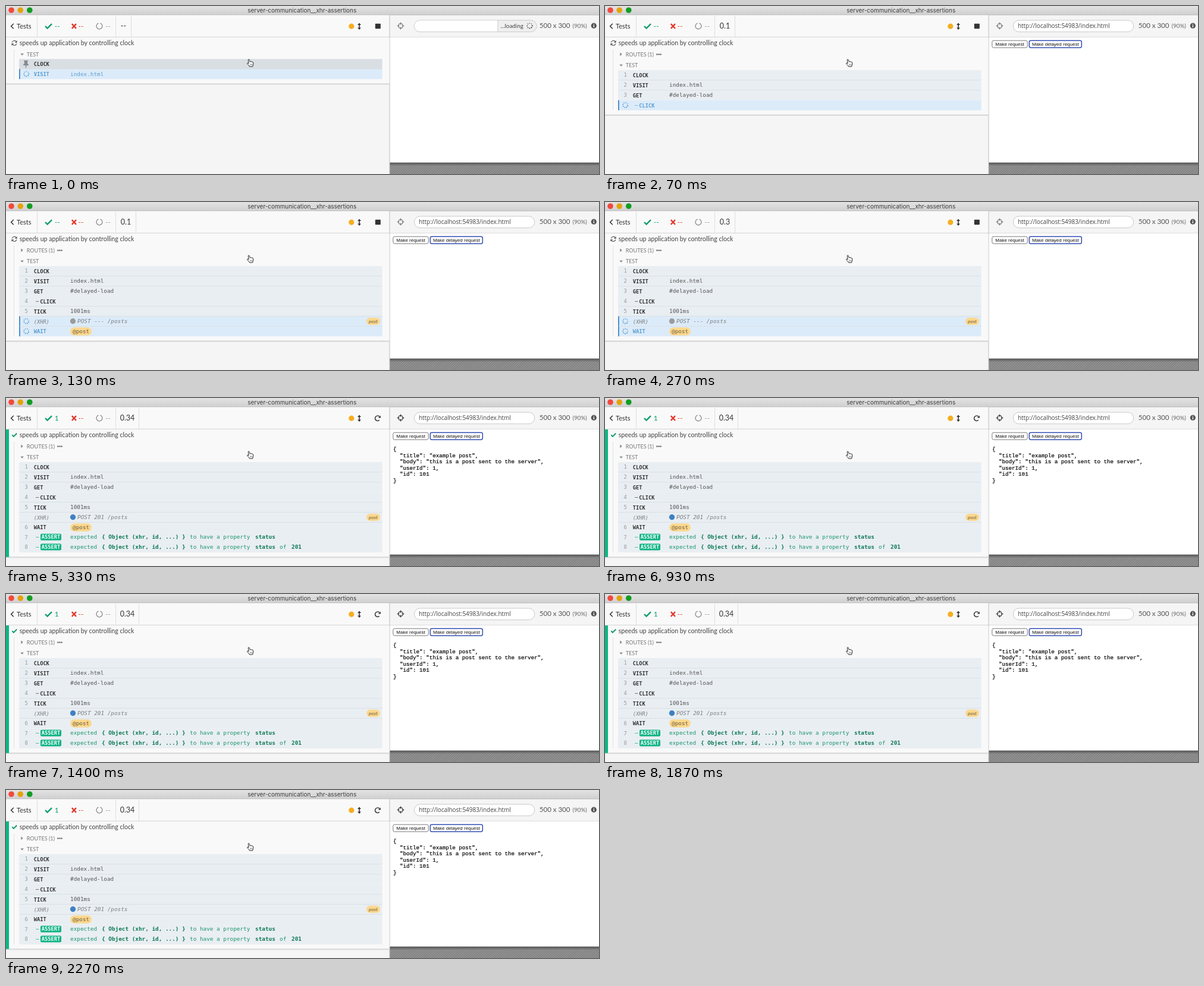
An HTML page that plays this animation: 997x283 px, repeating every 2.34 s.

```html
<!DOCTYPE html>
<html lang="en">
<head>
<meta charset="utf-8">
<title>Test runner</title>
<style>
  html, body { margin: 0; width: 100%; height: 100%; overflow: hidden; background: #f5f5f5; }
  svg { display: block; width: 997px; height: 283px; }
  text { white-space: pre; }
  .ui { font-family: Lato, sans-serif; }
  .mono { font-family: "DejaVu Sans Mono", monospace; }
  .arial { font-family: "Liberation Sans", sans-serif; }
  .courier { font-family: "Liberation Mono", monospace; }
  .url { font-family: "Open Sans", sans-serif; }
  .title { font-family: Inter, sans-serif; }
</style>
</head>
<body>
<svg id="stage" viewBox="0 0 997 283" xmlns="http://www.w3.org/2000/svg">
  <defs>
    <linearGradient id="bar" x2="0" y2="1">
      <stop offset="0" stop-color="#e4e3e4"/><stop offset="1" stop-color="#d0cfd0"/>
    </linearGradient>
    <linearGradient id="shade" x2="0" y2="1">
      <stop offset="0" stop-color="#333" stop-opacity=".65"/><stop offset="1" stop-color="#333" stop-opacity="0"/>
    </linearGradient>
    <pattern id="hatch" width="3" height="3" patternUnits="userSpaceOnUse" patternTransform="rotate(-45)">
      <rect width="3" height="3" fill="#979797"/><rect width="3" height="1.4" fill="#7c7c7c"/>
    </pattern>
  </defs>
  <g id="frame"></g>
  <g id="view"></g>
  <g id="pointer" transform="translate(405 89)" stroke="#222" stroke-width="1" stroke-linejoin="round" fill="#fff">
    <path d="M2.2 1.3Q3.4 .2 4.3 1.6L5.2 5Q6.2 4 7.2 5Q8.2 4.2 9 5.4Q10.4 5 10.7 6.6L10.6 9.6L9.6 13H4.4L3.4 11L.6 8.3Q.2 7 1.6 7L3.1 8Z"/>
    <path d="M5.6 8.5V11M7.2 8.5V11M8.8 8.5V11" stroke-width=".5"/>
  </g>
</svg>
<script>
const LOOP = 2340;
const GREEN = '#0f9d6c', RED = '#e33b2e', GREY = '#a0a0a0', BLUE = '#5a9ed2', INK = '#333';
const $ = id => document.getElementById(id);

const rect = (x, y, w, h, fill, extra = '') =>
  `<rect x="${x}" y="${y}" width="${w}" height="${h}" fill="${fill}" ${extra}/>`;
const circle = (x, y, r, fill, extra = '') => `<circle cx="${x}" cy="${y}" r="${r}" fill="${fill}" ${extra}/>`;
const line = (d, stroke, width = 1, extra = '') =>
  `<path d="${d}" fill="none" stroke="${stroke}" stroke-width="${width}" ${extra}/>`;
const text = (cls, x, y, size, fill, str, extra = '') =>
  `<text class="${cls}" x="${x}" y="${y}" font-size="${size}" fill="${fill}" ${extra}>${str}</text>`;
const mono = (x, y, fill, str, extra) => text('mono', x, y, 9.35, fill, str, extra);
const method = (x, y, fill, str, extra = 'font-weight="700"') => text('mono', x, y, 8.7, fill, str, extra);
const ITALIC = 'font-style="italic"', BOLD = 'font-weight="700"', MIDDLE = 'text-anchor="middle"';

function spinner(x, y, r, fill) {
  let dots = '';
  for (let i = 0; i < 8; i++) {
    const a = i * Math.PI / 4;
    dots += circle((r * Math.cos(a)).toFixed(2), (r * Math.sin(a)).toFixed(2), (1.1 - i * 0.05).toFixed(2), fill);
  }
  return `<g class="spin" data-at="${x} ${y}">${dots}</g>`;
}

function reload(x, y, r, color, width) {
  const k = r * 0.72;
  return line(`M${x + k} ${y + k}A${r} ${r} 0 1 1 ${x + k} ${y - k}`, color, width) +
    `<path d="M${x + r + 1} ${y - r - .6}v${r}h${-r}z" fill="${color}"/>`;
}

function cycle(x, y) {
  return line(`M${x - 3.8} ${y - 1}A4 4 0 0 1 ${x + 3} ${y - 2.7}M${x + 3.8} ${y + 1}A4 4 0 0 1 ${x - 3} ${y + 2.7}`, '#555', 1.2) +
    `<path d="M${x + 4.6} ${y - 4.4}v3.8h-3.8zM${x - 4.6} ${y + 4.4}v-3.8h3.8z" fill="#555"/>`;
}

const check = (x, y, s, w) =>
  line(`M${x} ${y}l${3.6 * s} ${3.6 * s}l${7.4 * s} ${-7.4 * s}`, GREEN, w);

function fixedParts() {
  let s = rect(0, 0, 997, 283, '#f5f5f5');
  s += rect(0, 0, 997, 15, 'url(#bar)') + line('M0 15H997', '#b9b8b9');
  s += circle(9, 7, 4.8, '#f2493c') + circle(24.2, 7, 4.8, '#e4a20c') + circle(39.8, 7, 4.8, '#129e22');
  s += text('title', 497.7, 10.7, 9.95, '#3c3c3c', 'server-communication__xhr-assertions', MIDDLE);

  s += rect(0, 15.5, 645, 36.5, '#f9f9f9') + line('M0 52.3H645', '#d5d5d5');
  s += line('M52.5 16V52M184.5 16V52', '#dedede');
  s += line('M12.8 29.8L8.6 34L12.8 38.2', INK, 1.5) + text('ui', 18, 37.6, 11, INK, 'Tests');
  s += check(66, 34, 1, 2.4);
  s += line('M110.8 30.2L118 37.8M118 30.2L110.8 37.8', RED, 2.4);
  s += text('ui', 121.5, 38, 12, RED, '--');
  s += line('M158.4 29.1A5 5 0 1 1 155.6 29.1', GREY, 1.6) + text('ui', 167.3, 38, 12, GREY, '--');
  s += circle(580.8, 34.2, 4.6, '#f5ae1f');
  s += line('M594 31V37.5', INK, 1.6) + `<path d="M594 28.4l3 3.6h-6zM594 40l3-3.6h-6z" fill="${INK}"/>`;

  s += rect(645, 53, 352, 211, '#fff') + line('M645 52.3H997', '#dcdcdc');
  s += rect(645, 264, 352, 19, 'url(#hatch)') + rect(645, 263.6, 352, 6, 'url(#shade)');
  s += text('ui', 896.8, 37.3, 11.5, '#555', '500 x 300') + text('ui', 952.6, 37, 9.7, '#666', '(90%)');
  s += circle(988.3, 33.2, 4.6, '#555') + rect(987.6, 32.4, 1.5, 3.4, '#fff') + circle(988.3, 30.8, .8, '#fff');
  return s + line('M645 15.5V283', '#bdbdbd');
}

const badge = (y) => rect(108, y - 6.6, 36, 13.4, '#fcd88f', 'rx="6.7"') + mono(112, y + 3.2, '#6b5a35', '@post');

function request(y, status, dot) {
  return circle(112.5, y - .2, 4.7, dot) + mono(120, y + 3, '#7b7f83', `POST ${status} /posts`, ITALIC) +
    rect(606, y - 6.3, 23, 12.4, '#fcd88f', 'rx="6.2"') + text('ui', 617.5, y + 2.6, 8.4, '#6b5a35', 'post', MIDDLE + ' ' + ITALIC);
}

function assertion(y, tail) {
  const soft = '#1c966b', strong = '#0a7851', b = y + 2.5;
  return mono(50, b, GREEN, '–') + rect(58, y - 6.1, 35, 11, '#09b384', 'rx="2"') + method(59.8, b, '#fff', 'ASSERT') +
    mono(108, b, soft, 'expected') + mono(161, b, strong, '{ Object (xhr, id, ...) }', BOLD) +
    mono(309, b, soft, 'to have a property') + mono(419, b, strong, 'status', BOLD) +
    (tail ? mono(460, b, soft, 'of') + mono(480, b, strong, tail, BOLD) : '');
}

// Each row: name, body(y), and flags for child, pending, hovered and number.
const plain = str => (y, pending) => mono(108, y + 2.8, pending ? BLUE : '#555', str);
const clock = { name: 'CLOCK', num: 1 };
const visit = { name: 'VISIT', num: 2, body: plain('index.html') };
const get = { name: 'GET', num: 3, body: plain('#delayed-load') };
const click = { name: 'CLICK', num: 4, child: true };
const tick = { name: 'TICK', num: 5, body: plain('1001ms') };
const xhr = { name: '(XHR)', italic: true, body: (y, p) => request(y, p ? '---' : '201', p ? '#9b9b9b' : '#3f81c4') };
const wait = { name: 'WAIT', num: 6, body: badge };
const assert = (num, tail) => ({ num, child: true, body: y => assertion(y, tail) });
const pend = row => ({ ...row, pending: true });

const started = [clock, visit, get, click, tick];
const waiting = { rows: [...started, pend(xhr), pend(wait)], page: true };
const states = [
  { at: 0, time: '--', split: 210.5, rows: [{ ...clock, hover: true }, pend(visit)] },
  { at: 70, time: '0.1', split: 218.5, rows: [clock, visit, get, pend(click)], page: true },
  { at: 130, time: '0.1', split: 218.5, ...waiting },
  { at: 200, time: '0.2', split: 218.5, ...waiting },
  { at: 270, time: '0.3', split: 218.5, ...waiting },
  { at: 330, time: '0.34', split: 223.5, rows: [...started, xhr, wait, assert(7), assert(8, '201')], page: true, done: true }
];

function drawRow(row, top, first) {
  const y = top + 8.5, fill = row.pending ? '#dcebf9' : row.hover ? '#d8dee2' : '#e9eef2';
  let s = rect(22, top, 610.5, 17, fill);
  if (!first && !row.child) s += line(`M22 ${top}H632.5`, '#d9e0e4');
  if (row.pending) s += rect(22, top, 1.8, 16.9, '#3f86c6') + spinner(34.2, y - .3, 4.1, BLUE);
  else if (row.hover) s += `<path d="M30 ${y - 6}h7v1.8h-1v3l2 2.4v1h-3.7v4h-1.6v-4h-3.7v-1l2-2.4v-3h-1z" fill="#858a8e"/>`;
  else if (row.num) s += text('mono', 34, y + 2.7, 8.7, '#999', row.num, MIDDLE);
  if (row.name) {
    const color = row.italic ? '#7b7f83' : row.pending ? BLUE : INK;
    if (row.child) s += mono(50, y + 3.2, color, '–');
    s += method(row.child ? 57.3 : 46.7, y + 3.5, color, row.name, row.italic ? ITALIC : BOLD);
  }
  return s + (row.body ? row.body(y, row.pending) : '');
}

function button(x, w, label, color, width) {
  return rect(x, 58.2, w, 12, '#fff', `rx="2.6" stroke="${color}" stroke-width="${width}"`) +
    text('arial', x + w / 2, 67.2, 8, '#111', label, MIDDLE);
}

function drawPage(st) {
  const aim = st.done ? '#333' : '#777', pill = 'rx="9.8" stroke="#c9c9c9"';
  let s = circle(663.5, 33.5, 3.9, 'none', `stroke="${aim}" stroke-width="1.3"`) +
    line('M663.5 27.5v4M663.5 35.5v4M657.5 33.5h4M665.5 33.5h4', aim, 1.2);
  if (!st.page) {
    return s + rect(686.3, 24, 206, 19.6, '#efefef', pill) +
      `<path d="M827 24.5H696a9.3 9.3 0 0 0 0 18.6H827z" fill="#fff"/>` + line('M827 24V43.6', '#c9c9c9') +
      text('ui', 831.5, 36.6, 9.9, '#444', '...loading') + spinner(880.5, 33.3, 4.3, '#444');
  }
  s += rect(686.3, 24, 202.4, 19.6, '#fff', pill) +
    text('url', 694, 37, 9.95, '#444', 'http://localhost:54983/index.html');
  s += button(650.8, 59.4, 'Make request', '#777', 1) + button(713.3, 88, 'Make delayed request', '#3450b4', 1.5);
  if (st.done) {
    const json = JSON.stringify({ title: 'example post', body: 'this is a post sent to the server', userId: 1, id: 101 }, null, 2);
    json.split('\n').forEach((row, i) => {
      s += text('courier', 651, 89.2 + i * 10.5, 9.2, '#000', row, 'stroke="#000" stroke-width=".2"');
    });
  }
  return s;
}

function drawState(st) {
  const head = st.page ? 100 : 81.5, top = st.page ? 108 : 89.3;
  const end = top + st.rows.length * 16.9, edge = st.page ? end + 7.8 : 131;
  let s = rect(0, 53, 644.5, edge - 53, '#f9f9f9');
  s += rect(0, edge - .4, 644.5, 1.2, '#c6c6c6') + rect(0, edge + .8, 644.5, 1, '#e6e6e6');
  s += line(`M13.5 73V${end}`, '#e2e2e2');
  if (st.done) s += rect(0, 53, 5, edge - 53, '#08b984') + check(10.3, 62.3, .72, 2);
  else s += cycle(14, 62.4);
  s += text('ui', 22.7, 66, 10.6, '#444', 'speeds up application by controlling clock');
  if (st.page) {
    s += '<path d="M25.3 78.3l3.4 3l-3.4 3z" fill="#888"/>' + text('ui', 34.8, 84.7, 9, '#777', 'ROUTES (1)');
    for (let i = 0; i < 3; i++) s += circle(87.4 + i * 3.1, 81.4, 1.25, '#666');
  }
  s += `<path d="M24.3 ${head - 1.4}h5.6l-2.8 3.2z" fill="#888"/>` + text('ui', 34.8, head + 3.2, 8.9, '#777', 'TEST');
  st.rows.forEach((row, i) => { s += drawRow(row, +(top + i * 16.9).toFixed(1), !i); });

  s += line(`M${st.split} 16V52`, '#dedede');
  s += text('ui', (184.5 + st.split) / 2, 38, 12.5, INK, st.time, MIDDLE);
  s += text('ui', 81.7, 38, 12, GREEN, st.done ? '1' : '--');
  s += st.done ? reload(624.7, 34.2, 4.2, INK, 1.6) : rect(620.8, 29.7, 9, 8.6, INK, 'rx=".8"');
  return s + drawPage(st);
}

let shown = null, spins = [];
function render(t) {
  const st = states.filter(s => s.at <= t).pop();
  if (st !== shown) {
    shown = st;
    $('view').innerHTML = drawState(st);
    spins = [...$('view').querySelectorAll('.spin')];
  }
  for (const g of spins) g.setAttribute('transform', `translate(${g.dataset.at}) rotate(${t * 0.18})`);
}

$('frame').innerHTML = fixedParts();
const start = performance.now();
function loop() {
  render((performance.now() - start) % LOOP);
  requestAnimationFrame(loop);
}
loop();
</script>
</body>
</html>
```
